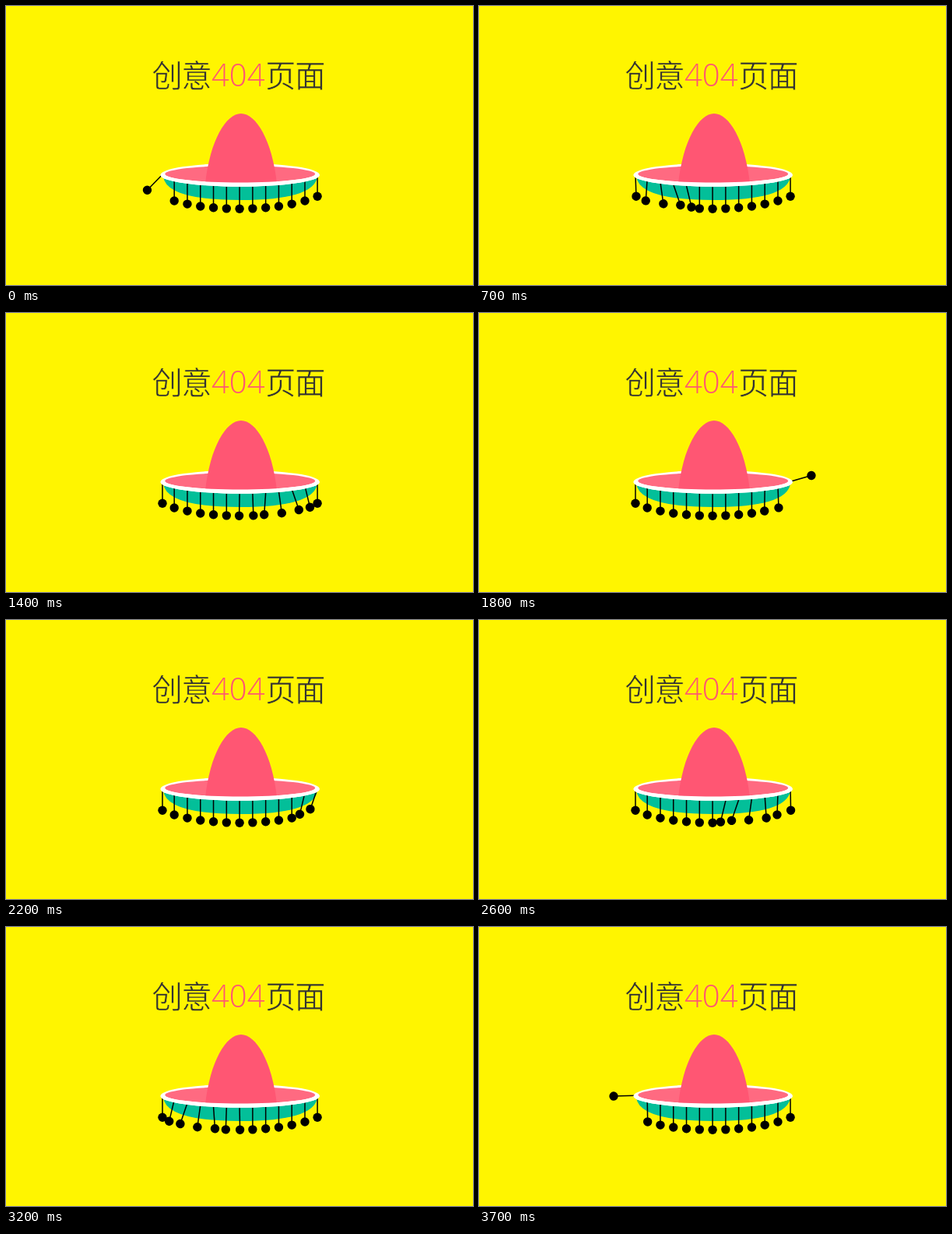
An HTML page that plays this animation: 600x358 px, repeating every 3.8 s.

```html
<!DOCTYPE html>
<html lang="zh">
<head>
<meta charset="utf-8">
<title>404</title>
<style>
  html, body { margin: 0; width: 100%; height: 100%; overflow: hidden; background: #fff500; }
  svg { display: block; width: 100%; height: 100%; }
  .han {
    font: 400 39.5px "Noto Sans CJK SC", "Noto Sans CJK", sans-serif;
    letter-spacing: -1.5px;
    fill: #333;
    /* background-coloured outline slims the strokes */
    stroke: #fff500;
    stroke-width: .7px;
  }
  .num { font: 300 40px "Open Sans", sans-serif; fill: #ff5573; }
  .tassel line { stroke: #000; stroke-width: 1.5; }
</style>
</head>
<body>
<svg viewBox="0 0 600 358">
  <text class="han" x="187.300" y="103.500">创意</text>
  <text class="num" x="264" y="103">404</text>
  <text class="han" x="333" y="103.500">页面</text>

  <path fill="#03bf99" d="M202 219Q206 249 301 249Q396 249 400 219Z"/>
  <g id="fringe"></g>

  <!-- brim, crown, then the front half of the rim over the crown -->
  <ellipse cx="300.700" cy="216.700" rx="102.200" ry="15" fill="#fff"/>
  <ellipse cx="300.700" cy="215.700" rx="96.500" ry="10.800" fill="#ff6a81"/>
  <path fill="#ff5673" d="M256 228C262 172 283 138 302 138C321 138 342 172 348 228Z"/>
  <path fill="#fff" d="M198.500 216.700a102.200 15 0 0 0 204.400 0L397.200 215.700a96.500 10.800 0 0 1 -193 0Z"/>
</svg>
<script>
  const STEP = 100, STEPS = 38, LEN = 28, LAST = 12;
  const fringe = document.getElementById('fringe');

  const make = (name, attrs, parent) => {
    const el = document.createElementNS('http://www.w3.org/2000/svg', name);
    for (const key in attrs) el.setAttribute(key, attrs[key]);
    return parent.appendChild(el);
  };

  // evenly spaced along the curve of the brim, the end ones held at its tips
  const tassels = Array.from({ length: LAST + 1 }, (_, i) => {
    const d = i - LAST / 2, q = d / 6;
    const x = Math.min(400.1, Math.max(201, 300.1 + 16.78 * d));
    const y = 260.2 - 12 * q ** 2 - 4 * q ** 4;
    const g = make('g', { class: 'tassel' }, fringe);
    make('line', { x1: x, y1: y - LEN, x2: x, y2: y }, g);
    make('circle', { cx: x, cy: y, r: 5.7 }, g);
    return { g, x, top: y - LEN };
  });

  // degrees, u steps after the wave arrives: a swing, then a halving wobble
  function nudge(u) {
    if (u < 0 || u > 6) return 0;
    return u < 3 ? 19 * Math.sin(Math.PI * u / 4) : -64 * (-0.5) ** u;
  }

  // full throw of an end tassel: slow to the top, then a fast fall
  function fling(u) {
    if (u < 0) return 0;
    if (u < 4) return 106 * Math.sin(Math.PI * u / 8);
    return Math.max(0, 106 * (1 - ((u - 4) / 2.7) ** 1.8));
  }

  // positive angles lean right
  function angle(i, step) {
    const right = step - 2 - i, left = step - 32 + i;
    if (i === 0) return nudge(right) - fling((step + STEPS - 32) % STEPS);
    if (i === LAST) return step < 20 ? fling(right) : -nudge(left);
    return nudge(right) - nudge(left);
  }

  function draw(now) {
    const step = Math.floor(now / STEP) % STEPS;
    tassels.forEach(({ g, x, top }, i) =>
      g.setAttribute('transform', `rotate(${-angle(i, step)} ${x} ${top})`));
    requestAnimationFrame(draw);
  }
  draw(0);
</script>
</body>
</html>
```
